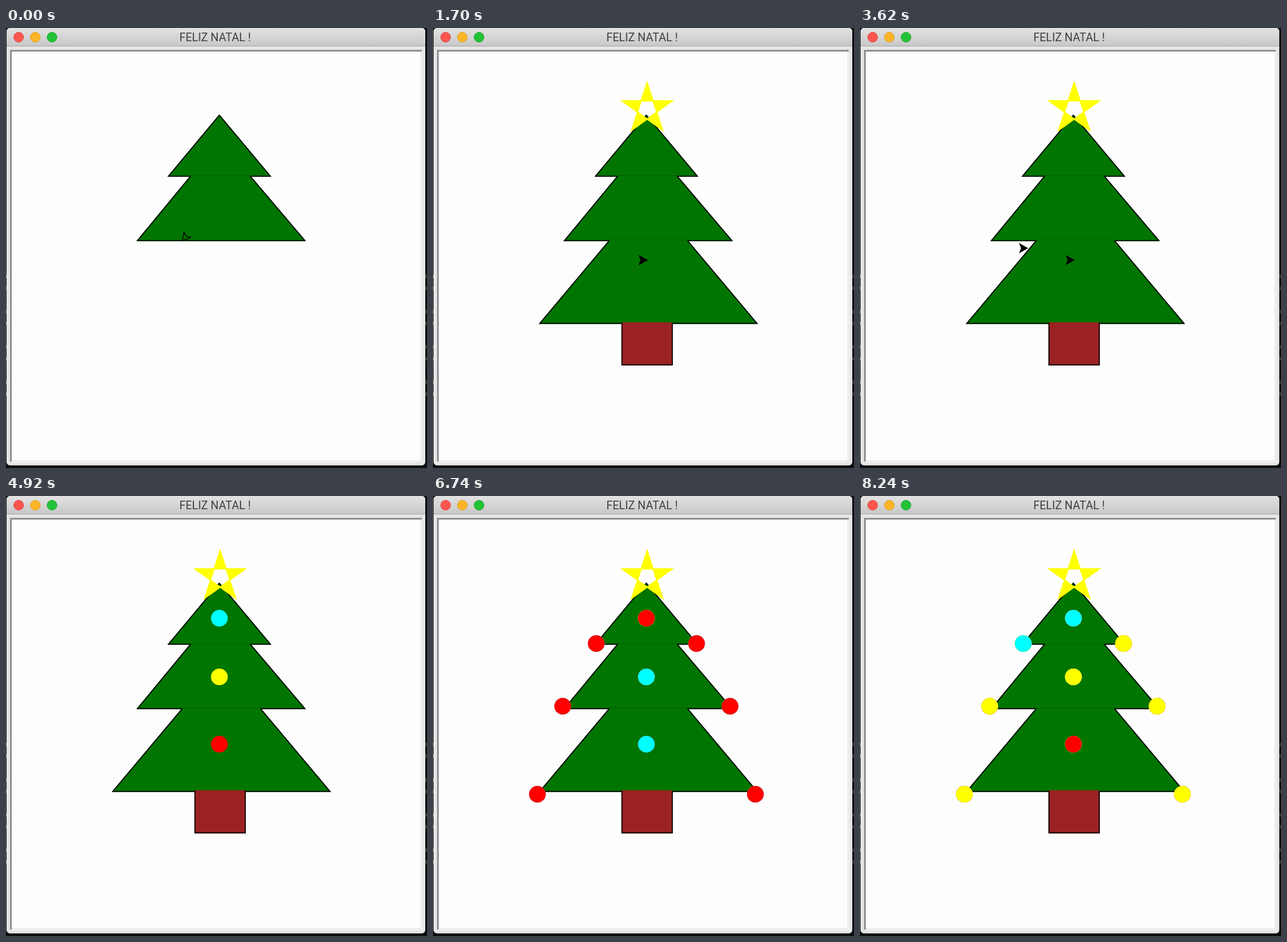
An HTML page with a canvas for the animation above (8340 ms loop, 732 by 765 pixels).

```html
<!DOCTYPE html>
<html lang="pt">
<head>
<meta charset="utf-8">
<title>FELIZ NATAL !</title>
<style>
  html, body { margin: 0; width: 100%; height: 100%; overflow: hidden; background: #0c0d10; }
  canvas { position: absolute; left: 0; top: 0; }
  #title {
    position: absolute; left: 301.4px; top: 1px; line-height: 32px;
    white-space: nowrap; color: #404040;
    font-family: Roboto, Inter, sans-serif; font-size: 19.6px;
  }
</style>
</head>
<body>
<canvas id="stage" width="732" height="765"></canvas>
<div id="title">FELIZ NATAL !</div>
<script>
const ctx = document.getElementById('stage').getContext('2d');
const LOOP = 8340, LAST_TICK = 176;
const GREEN = '#007500', BROWN = '#9b2222', YELLOW = '#ffff00', RED = '#ff0000', CYAN = '#00ffff';
const HOME = { x: 371.5, y: 403, deg: 0 };
const PEN_RATE = 2.74, MOVER_START = 56, MOVER_RATE = 2.1, DOT_START = 100;

const mix = (a, b, k) => a + (b - a) * k;
const blend = (a, b, k) => ({ x: mix(a.x, b.x, k), y: mix(a.y, b.y, k), deg: mix(a.deg, b.deg, k) });
const steps = (size, stride) => 1 + Math.floor(Math.abs(size) / stride);
const distance = (a, b) => Math.hypot(b.x - a.x, b.y - a.y);

// Turtle: every move costs a number of screen updates
const shapes = [];
let pen = { x: 306, y: 369, deg: 130 }, clock = 0, shape;

function move(change, cost, ink = false) {
  const from = pen;
  pen = { ...pen, ...change };
  shape.moves.push({ from, to: pen, start: clock, end: clock + cost, ink });
  clock += cost;
}
function goTo(x, y) { move({ x, y }, steps(distance(pen, { x, y }), 113)); }
function turn(deg) { move({ deg: pen.deg + deg }, steps(deg, 30)); }
function forward(d) {
  const a = pen.deg * Math.PI / 180;
  move({ x: pen.x + d * Math.cos(a), y: pen.y + d * Math.sin(a) }, steps(d, 113), true);
}
function begin(fill, ink) {
  shape = { fill, ink, moves: [], start: clock };
  shapes.push(shape);
}
function end() {
  const lines = shape.moves.filter(m => m.ink);
  shape.points = [lines[0].from, ...lines.map(m => m.to)];
  shape.end = clock;
}

begin(GREEN, '#000');
forward(188); turn(-130); forward(377.5); turn(-130); forward(188);
end();

begin(BROWN, '#000');
goTo(328, 512); turn(-140);
forward(73); turn(-90); forward(87.5); turn(-90); forward(73);
end();

begin(YELLOW, YELLOW);
goTo(328, 126); turn(90);
for (let i = 0; i < 5; i++) { forward(87.5); turn(144); }
end();

// Baubles: three in the middle, then left/right pairs downwards
const middle = [212.5, 314.5, 431.5].map(y => ({ x: 371, y, deg: 0 }));
const sides = [[87.2, 256.5], [145.5, 365.5], [189.5, 518.5]]
  .flatMap(([dx, y]) => [-dx, dx].map(d => ({ x: 371 + d, y, deg: 0 })));
const spots = [...middle, ...sides];
const middleColors = [CYAN, YELLOW, RED], sideColors = [CYAN, RED, YELLOW];

function path(points) {
  ctx.beginPath();
  points.forEach(p => ctx.lineTo(p.x, p.y));
}
function stroke(color, width = 1.7) {
  ctx.strokeStyle = color;
  ctx.lineWidth = width;
  ctx.stroke();
}
function solid(points, fill, ink) {
  path(points);
  ctx.closePath();
  ctx.fillStyle = fill;
  ctx.fill('evenodd');
  stroke(fill, 1.9);
  path(points);
  stroke(ink);
}
function disc(x, y, r, fill, edge) {
  ctx.beginPath();
  ctx.arc(x, y, r, 0, 7);
  ctx.fillStyle = fill;
  ctx.fill();
  if (edge) stroke(edge, 1);
}
function box(x, y, w, h, fill) {
  ctx.fillStyle = fill;
  ctx.fillRect(x, y, w, h);
}
function arrow({ x, y, deg }, fill, ink) {
  ctx.save();
  ctx.translate(x, y);
  ctx.rotate(deg * Math.PI / 180);
  ctx.beginPath();
  ctx.moveTo(0, 0);
  ctx.lineTo(-13.1, -7.3);
  ctx.lineTo(-10.2, 0);
  ctx.lineTo(-13.1, 7.3);
  ctx.closePath();
  ctx.fillStyle = fill;
  ctx.fill();
  stroke(ink, 1.46);
  ctx.restore();
}

function drawWindow() {
  box(0, 0, 732, 765, '#0c0d10');
  for (let i = 0; i < 8; i++) {
    const y = 429 + Math.floor(i / 2) * 61.3 + (i % 2) * 20.4;
    box(0, y, 1, 6, '#777');
    box(730, y, 1, 6, '#777');
  }
  ctx.beginPath();
  ctx.roundRect(1, 0, 728, 760.5, 6);
  ctx.fillStyle = '#e6e6e6';
  ctx.fill();
  ctx.save();
  ctx.clip();
  const bar = ctx.createLinearGradient(0, 0, 0, 31);
  bar.addColorStop(0, '#e2e2e2');
  bar.addColorStop(1, '#c8c8c8');
  box(1, 0, 728, 31, bar);
  box(1, 31, 728, 1, '#a6a6a6');
  ctx.restore();
  box(7, 38, 717, 717, '#f4f4f4');
  box(7, 38, 716, 3, '#8e8e93');
  box(7, 38, 3, 716, '#8e8e93');
  box(10, 41, 712, 712, '#dedede');
  box(10, 41, 711, 711, '#fdfdfd');
  disc(22, 16, 8.5, '#fc564f', '#dd4640');
  disc(51, 16, 8.5, '#fdb528', '#dd9c22');
  disc(80, 16, 8.5, '#22c336', '#1ba72c');
}

function drawTier(top, base, topLeft, left, right, topRight) {
  solid([{ x: topLeft, y: top }, { x: left, y: base }, { x: right, y: base }, { x: topRight, y: top }], GREEN, '#000');
}

function drawShapes(tick) {
  const now = Math.floor(tick * PEN_RATE);
  for (const s of shapes) {
    if (now < s.start) break;
    if (now >= s.end) {
      solid(s.points, s.fill, s.ink);
      continue;
    }
    let pose;
    for (const m of s.moves.filter(m => m.start <= now)) {
      pose = blend(m.from, m.to, Math.min(1, (now - m.start) / (m.end - m.start)));
      if (m.ink) {
        path([m.from, pose]);
        stroke(s.ink);
      }
    }
    arrow(pose, s.fill, s.ink);
  }
  return now >= clock;
}

function drawMovers(tick) {
  let hop = Math.max(0, Math.floor((tick - MOVER_START) * MOVER_RATE));
  for (const spot of spots) {
    const count = steps(distance(HOME, spot), 17.45);
    if (hop < count) {
      if (spot !== spots[spots.length - 1]) arrow(HOME, '#000', '#000');
      arrow(blend(HOME, spot, hop / count), '#000', '#000');
      return;
    }
    hop -= count;
  }
}

// Painting slows down a little as dots pile up
function drawDots(tick) {
  const count = Math.floor(0.889 * Math.max(0, tick - DOT_START) ** 0.823);
  for (let i = 0; i < count; i++) {
    const n = i % spots.length, round = Math.floor(i / spots.length);
    const color = n < 3 ? middleColors[(n + round) % 3] : sideColors[round % 3];
    disc(spots[n].x, spots[n].y, 14.6, color);
  }
}

// Ticks come in threes lasting 20, 100 and 20 ms
function tickAt(t) {
  const part = t % 140;
  return Math.min(LAST_TICK, Math.floor(t / 140) * 3 + (part >= 20) + (part >= 120));
}

const startTime = performance.now();
function draw() {
  const tick = tickAt((performance.now() - startTime) % LOOP);
  drawWindow();
  ctx.save();
  ctx.translate(0.6, 0.6);
  drawTier(151, 257, 370.3, 282, 459, 370.3);
  drawTier(257, 369, 320.5, 228, 519, 424);
  if (drawShapes(tick)) drawMovers(tick);
  ctx.restore();
  drawDots(tick);
  requestAnimationFrame(draw);
}
draw();
</script>
</body>
</html>
```
